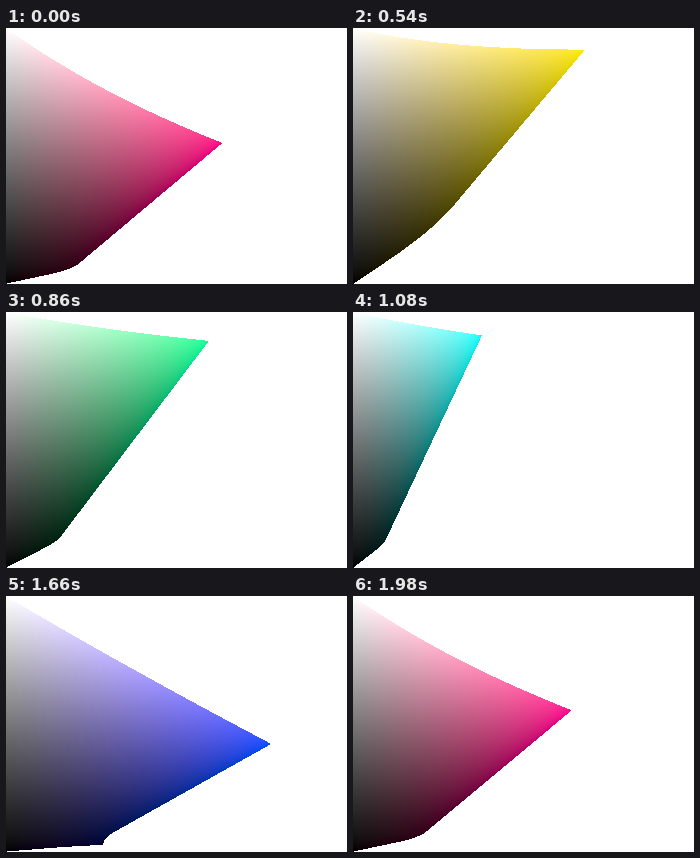
An HTML page with a canvas for the animation above (2000 ms loop, 341 by 256 pixels).

```html
<!DOCTYPE html>
<html lang="en">
<head>
<meta charset="utf-8">
<title>Hue slices of the sRGB gamut in CIE LCh</title>
<style>
  html, body { margin: 0; width: 100%; height: 100%; overflow: hidden; background: #fff; }
  canvas { display: block; width: 100vw; height: 100vh; image-rendering: pixelated; }
</style>
</head>
<body>
<canvas id="slice" width="341" height="256"></canvas>
<script>
const W = 341, H = 256;
const STEPS = 100, STEP_MS = 20;
const MAX_CHROMA = 134;
const WHITE = { x: 0.95047, z: 1.08883 };

const ctx = document.getElementById('slice').getContext('2d');
const image = ctx.createImageData(W, H);
const pixels = new Uint32Array(image.data.buffer);

// Linear light to 8-bit sRGB
const LEVELS = 8192;
const gamma = Uint8Array.from({ length: LEVELS + 1 }, (_, i) => {
  const v = i / LEVELS;
  return Math.round(255 * (v <= 0.0031308 ? 12.92 * v : 1.055 * v ** (1 / 2.4) - 0.055));
});
const encode = v => gamma[Math.max(0, Math.min(LEVELS, Math.round(v * LEVELS)))];

const labInverse = f => f > 6 / 29 ? f * f * f : (f - 4 / 29) * 108 / 841;
const EPS = 1e-5;
const inside = v => v >= -EPS && v <= 1 + EPS;

// Chroma runs right, lightness runs up; colours outside sRGB stay white
function draw(step) {
  const hue = 2 * Math.PI * step / STEPS;
  const cos = Math.cos(hue), sin = Math.sin(hue);
  pixels.fill(0xffffffff);
  for (let row = 0; row < H; row++) {
    const lightness = 100 * (1 - row / (H - 1));
    const fy = (lightness + 16) / 116;
    const Y = labInverse(fy);
    for (let col = 0; col < W; col++) {
      const chroma = MAX_CHROMA * col / (W - 1);
      const X = WHITE.x * labInverse(fy + chroma * cos / 500);
      const Z = WHITE.z * labInverse(fy - chroma * sin / 200);
      const r = 3.2404542 * X - 1.5371385 * Y - 0.4985314 * Z;
      const g = -0.9692660 * X + 1.8760108 * Y + 0.0415560 * Z;
      const b = 0.0556434 * X - 0.2040259 * Y + 1.0572252 * Z;
      if (inside(r) && inside(g) && inside(b)) {
        pixels[row * W + col] = 0xff000000 | encode(b) << 16 | encode(g) << 8 | encode(r);
      }
    }
  }
  ctx.putImageData(image, 0, 0);
}

const start = performance.now();
let shown = -1;

function tick() {
  const elapsed = Math.max(0, performance.now() - start);
  const step = Math.floor(elapsed / STEP_MS + 0.001) % STEPS;
  if (step !== shown) {
    draw(step);
    shown = step;
  }
  requestAnimationFrame(tick);
}
tick();
</script>
</body>
</html>
```
